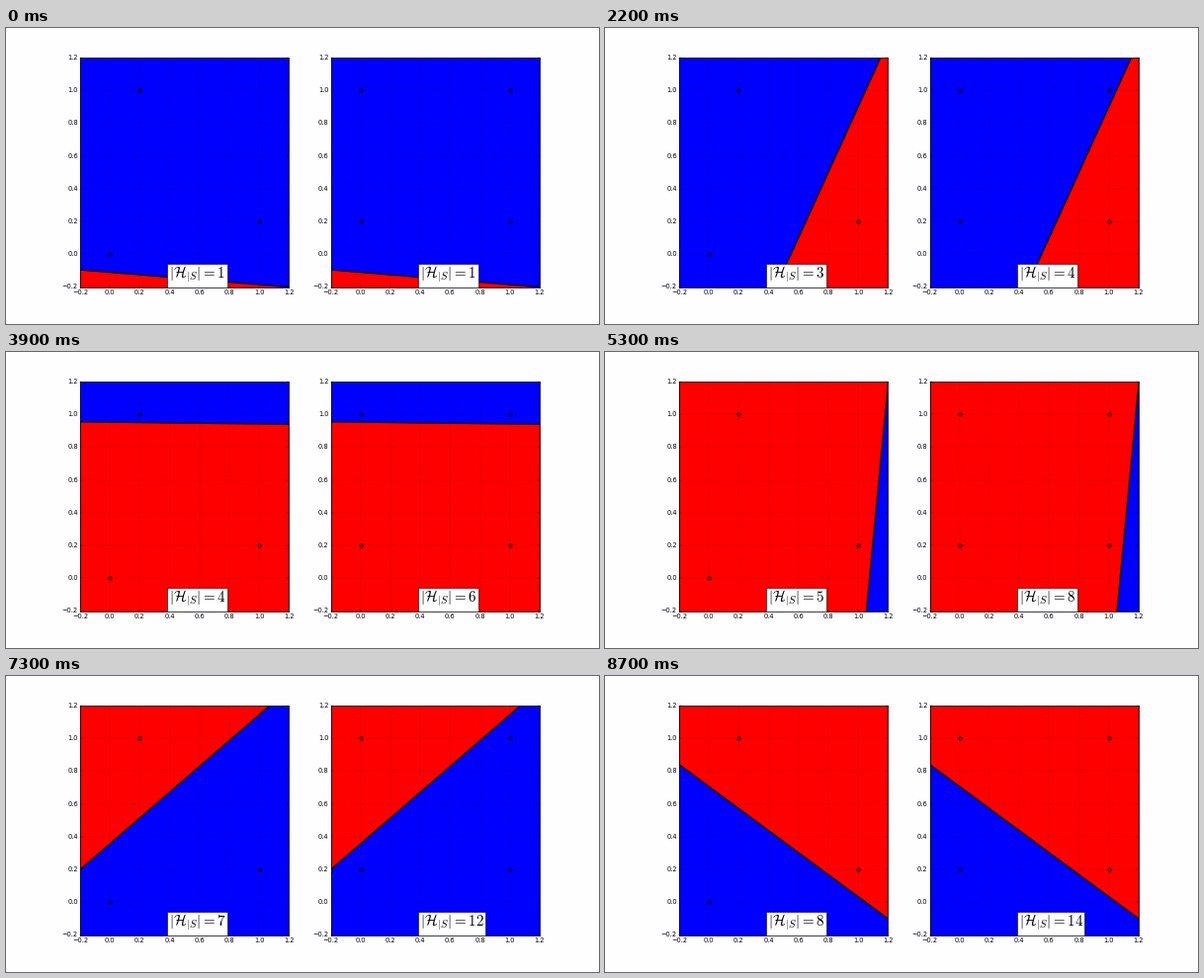
Animation of 600 by 300 pixels, one loop 8.8 s. Source, as a matplotlib script:

```python
import numpy as np
import matplotlib.pyplot as plt
from matplotlib.animation import FuncAnimation
from matplotlib.patches import Polygon, Rectangle

plt.style.use("classic")
plt.rcParams["font.family"] = "DejaVu Sans"
plt.rcParams["mathtext.fontset"] = "cm"

FRAMES, INTERVAL = 88, 100
CENTER = np.array([0.5, 0.5])
POINT_SETS = [
    [(0.2, 1.0), (1.0, 0.2), (0.0, 0.0)],
    [(0.0, 1.0), (1.0, 1.0), (0.0, 0.2), (1.0, 0.2)],
]

# Key poses of the line: frame, direction of the red side (deg), offset from CENTER
KEYS = [
    (0, -94.3, 0.646), (3, -100, 0.45), (6, 0, 0.30), (10, -26.4, 0.337),
    (17, 30, 0.40), (22, -26.6, 0.268), (31, -48, -0.30), (39, -90.6, -0.447),
    (53, -186, -0.625), (68, -165, 0.42), (73, -231.8, 0.197),
    (87, -303.9, -0.108),
]


def pose(frame):
    """Unit normal towards the red side and offset of the line."""
    times, angles, offsets = zip(*KEYS)
    angle = np.radians(np.interp(frame, times, angles))
    normal = np.array([np.cos(angle), np.sin(angle)])
    return normal, np.interp(frame, times, offsets)


def count_labelings(points):
    """Number of different labelings met up to each frame."""
    seen, counts = set(), []
    for frame in range(FRAMES):
        normal, offset = pose(frame)
        seen.add(tuple((np.array(points) - CENTER) @ normal > offset))
        counts.append(len(seen))
    return counts


class Panel:
    def __init__(self, fig, left, points):
        self.counts = count_labelings(points)
        ax = fig.add_axes([left, 0.125, 0.775 / 2.2, 0.775], facecolor="blue")
        self.red = ax.add_patch(
            Polygon(np.zeros((4, 2)), fc="red", ec="none", zorder=1))
        self.line, = ax.plot([], [], "k-", lw=2.5, zorder=2)
        ax.plot(*zip(*points), "o", ms=6, mfc="none", mec="black", mew=1.6,
                zorder=3)
        ticks = np.arange(-1, 7) / 5
        ax.set(xticks=ticks, yticks=ticks, xlim=(-0.2, 1.2), ylim=(-0.2, 1.2))
        ax.grid(True)
        for spine in ax.spines.values():
            spine.set_linewidth(1.5)
        self.box = ax.add_patch(
            Rectangle((0.3845, -0.2), 0.404, 0.1435, fc="white",
                      ec="black", lw=1, zorder=4, clip_on=False))
        self.label = ax.text(0.397, -0.148, "", fontsize=27, zorder=5)

    def update(self, frame, normal, offset):
        along = np.array([-normal[1], normal[0]]) * 5
        foot = CENTER + offset * normal
        a, b = foot - along, foot + along
        self.red.set_xy([a, b, b + 5 * normal, a + 5 * normal])
        self.line.set_data([a[0], b[0]], [a[1], b[1]])
        count = self.counts[frame]
        self.label.set_text(r"$|\mathcal{H}_{|S}| = %d$" % count)
        self.box.set_width(0.358 + 0.046 * len(str(count)))


fig = plt.figure(figsize=(15, 7.5), dpi=40, facecolor="#fefdff")
panels = [Panel(fig, 0.125 + i * 0.93 / 2.2, points)
          for i, points in enumerate(POINT_SETS)]


def update(frame):
    normal, offset = pose(frame)
    for panel in panels:
        panel.update(frame, normal, offset)
    return []


anim = FuncAnimation(fig, update, frames=FRAMES, interval=INTERVAL,
                     init_func=lambda: update(0), repeat=True, repeat_delay=0)
plt.show()
```
